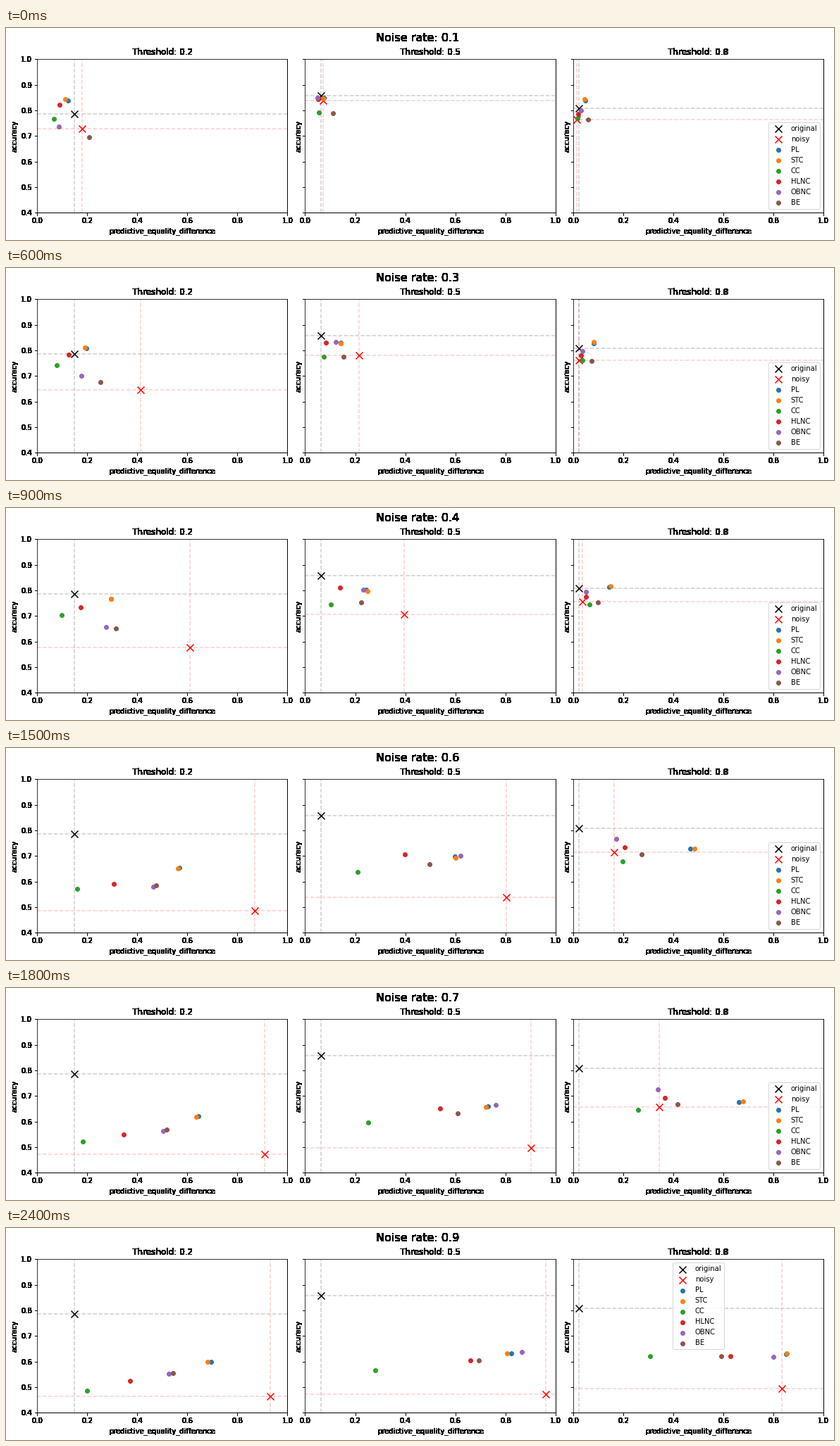
A matplotlib script that plays this animation: 1175 by 301 pixels, repeating every 2700 ms.

```python
import numpy as np
import matplotlib.pyplot as plt
from matplotlib.animation import FuncAnimation

W, H, DPI = 1175, 301, 72
LEFT, PITCH, WIDTH = 44.03, 380.445, 355.37
TOP, BOTTOM = 44.48, 262.1
NAMES = ["original", "noisy", "PL", "STC", "CC", "HLNC", "OBNC", "BE"]
COLORS = ["k", "r"] + [f"C{i}" for i in range(6)]
RATES = np.arange(1, 10) / 10

# Threshold: (fixed reference point, one path per method).
# A path is its start, its end and the noise rate at which it is halfway.
PANELS = {
    0.2: ((.149, .786), [
        ((.181, .728), (.932, .464), .36),
        ((.125, .838), (.696, .599), .48),
        ((.113, .844), (.682, .599), .47),
        ((.068, .767), (.200, .486), .52),
        ((.091, .822), (.370, .524), .48),
        ((.087, .737), (.527, .553), .42),
        ((.209, .695), (.544, .556), .47),
    ]),
    0.5: ((.064, .858), [
        ((.072, .838), (.962, .472), .45),
        ((.076, .851), (.822, .631), .52),
        ((.072, .848), (.805, .633), .51),
        ((.056, .793), (.281, .566), .53),
        ((.053, .844), (.661, .604), .58),
        ((.050, .851), (.864, .637), .52),
        ((.110, .790), (.695, .604), .54),
    ]),
    0.8: ((.024, .808), [
        ((.014, .764), (.832, .494), .78),
        ((.047, .838), (.851, .628), .60),
        ((.044, .844), (.854, .633), .59),
        ((.018, .771), (.308, .620), .56),
        ((.021, .785), (.629, .620), .70),
        ((.030, .800), (.798, .617), .78),
        ((.058, .764), (.590, .620), .65),
    ]),
}


def solid(img, dpi):
    """Turn every touched pixel fully black, for hard-edged text."""
    out = np.zeros_like(img)
    out[..., 3] = img[..., 3] > 0
    return out, 0, 0


def position(path, rate):
    """Point on a path, moved along by a logistic curve of the noise rate."""
    start, end, mid = path
    curve = 1 / (1 + np.exp((mid - np.array([RATES[0], rate, RATES[-1]])) / 0.1))
    progress = (curve[1] - curve[0]) / (curve[2] - curve[0])
    return np.array(start) + progress * np.subtract(end, start)


def cross_lines(ax, point, color):
    style = dict(color=color, ls="--", alpha=0.2)
    return ax.axvline(point[0], **style), ax.axhline(point[1], **style)


class Panel:
    def __init__(self, col, threshold):
        reference, self.paths = PANELS[threshold]
        self.ax = ax = fig.add_axes([(LEFT + col * PITCH) / W, 1 - BOTTOM / H,
                                     WIDTH / W, (BOTTOM - TOP) / H])
        ax.set(xlim=(0, 1), ylim=(0.4, 1), xticks=np.arange(6) / 5,
               yticks=np.arange(4, 11) / 10)
        ax.set_title(f"Threshold: {threshold}")
        ax.set_xlabel("predictive_equality_difference")
        ax.set_ylabel("accuracy", labelpad=0.5 if col else 4)
        ax.tick_params(labelleft=col == 0)
        for part in (ax.title, ax.xaxis, ax.yaxis,
                     ax.spines["right"], ax.spines["bottom"]):
            part.set_agg_filter(solid)

        points = [reference] + [path[0] for path in self.paths]
        self.dots = []
        for point, color, name in zip(points, COLORS, NAMES):
            crossed = name in ("original", "noisy")
            style = dict(marker="x", s=100) if crossed else dict(s=36)
            self.dots.append(ax.scatter(*point, color=color, label=name, **style))
        cross_lines(ax, reference, "k")
        self.vline, self.hline = cross_lines(ax, points[1], "r")

    def update(self, rate):
        points = [position(path, rate) for path in self.paths]
        for dot, point in zip(self.dots[1:], points):
            dot.set_offsets([point])
        x, y = points[0]
        self.vline.set_xdata([x, x])
        self.hline.set_ydata([y, y])


plt.rcParams.update({"font.family": "DejaVu Sans", "font.size": 10})
fig = plt.figure(figsize=((W + 1e-6) / DPI, (H + 1e-6) / DPI), dpi=DPI,
                 facecolor="white")
panels = [Panel(col, threshold) for col, threshold in enumerate(PANELS)]
legend = panels[-1].ax.legend(loc="lower right")
heading = fig.text(584 / W, 1 - 19 / H, "", size=16, ha="center", va="baseline")
heading.set_agg_filter(solid)


def update(i):
    rate = RATES[i]
    heading.set_text(f"Noise rate: {rate:.1f}")
    for panel in panels:
        panel.update(rate)
    legend.set_loc({7: "upper right", 8: "upper center"}.get(i, "lower right"))


anim = FuncAnimation(fig, update, frames=len(RATES), interval=300,
                     init_func=lambda: update(0), repeat=True, repeat_delay=0)
plt.show()
```
